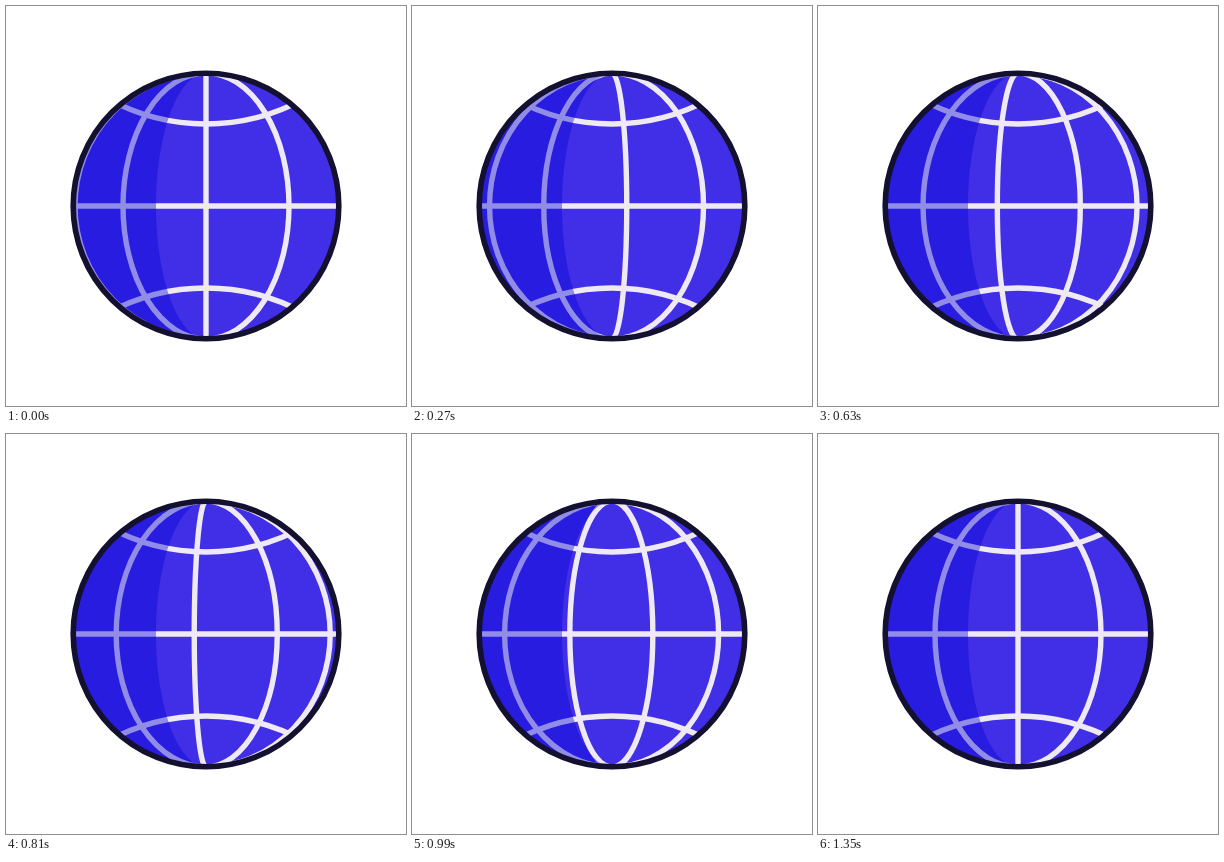
An HTML page with a canvas that plays this animation: 400 by 400 pixels, repeating every 3.97 s.

```html
<!DOCTYPE html>
<html lang="en">
<head>
<meta charset="utf-8">
<title>Spinning globe</title>
<style>
  html, body { margin: 0; width: 100%; height: 100%; overflow: hidden; background: #fff; }
  canvas { display: block; width: 100vmin; height: 100vmin; }
</style>
</head>
<body>
<canvas id="stage" width="400" height="400"></canvas>
<script>
const ctx = document.getElementById('stage').getContext('2d');
const LOOP = 3970, STEP = 30, SPIN = 1350;
const FAST_FROM = 508, FAST_TO = 833;
const C = 200, R = 132.8, POLE = 133;
const LINE = '#efe9f4';

// Cubic bezier easing solved by bisection
function bezier(x1, y1, x2, y2) {
  const at = (a, b, t) => 3 * (1 - t) * (1 - t) * t * a + 3 * (1 - t) * t * t * b + t * t * t;
  return x => {
    let lo = 0, hi = 1;
    for (let i = 0; i < 24; i++) {
      const mid = (lo + hi) / 2;
      if (at(x1, x2, mid) < x) lo = mid; else hi = mid;
    }
    return at(y1, y2, (lo + hi) / 2);
  };
}
const speedUp = bezier(0.805, 0, 0.833, 0.833);
const slowDown = bezier(0.167, 0.167, 0.435, 1);

// Number of meridian spacings travelled to the right
function travel(ms) {
  if (ms >= SPIN) return 4;
  if (ms < FAST_FROM) return speedUp(ms / FAST_FROM);
  if (ms < FAST_TO) return 1 + 2 * (ms - FAST_FROM) / (FAST_TO - FAST_FROM);
  return 3 + slowDown((ms - FAST_TO) / (SPIN - FAST_TO));
}

// Signed half width of a meridian at position p, centre = 0, rim = 2
function bulge(p) {
  const a = Math.abs(p);
  return Math.sign(p) * (a < 1 ? 83 * a : 83 + 48 * (a - 1));
}

function meridian(p) {
  const w = bulge(p);
  ctx.beginPath();
  if (Math.abs(w) < 0.01) {
    ctx.moveTo(C, C - POLE);
    ctx.lineTo(C, C + POLE);
  } else {
    ctx.ellipse(C, C, Math.abs(w), POLE, 0, -Math.PI / 2, Math.PI / 2, w < 0);
  }
  ctx.stroke();
}

function parallels() {
  ctx.beginPath();
  ctx.moveTo(C - R, C);
  ctx.lineTo(C + R, C);
  ctx.stroke();
  for (const side of [-1, 1]) {
    ctx.beginPath();
    ctx.arc(C, C + side * 286.5, 204.5, -side * Math.PI / 2 - 0.5, -side * Math.PI / 2 + 0.5);
    ctx.stroke();
  }
}

function shade() {
  ctx.beginPath();
  ctx.arc(C, C, R, Math.PI / 2, Math.PI * 1.5);
  ctx.ellipse(C, C, 50, R, 0, Math.PI * 1.5, Math.PI / 2, true);
  ctx.fillStyle = 'rgba(0, 0, 210, 0.4)';
  ctx.fill();
}

function draw(ms) {
  ctx.fillStyle = '#fff';
  ctx.fillRect(0, 0, 400, 400);

  ctx.save();
  ctx.beginPath();
  ctx.arc(C, C, R, 0, Math.PI * 2);
  ctx.clip();
  ctx.fillStyle = '#412fe7';
  ctx.fillRect(0, 0, 400, 400);

  ctx.strokeStyle = LINE;
  ctx.lineWidth = 5.4;
  parallels();
  const shift = travel(ms) % 1;
  for (let k = -2; k <= 1; k++) {
    if (k + shift > -2) meridian(k + shift);
  }
  shade();
  ctx.restore();

  ctx.beginPath();
  ctx.arc(C, C, R, 0, Math.PI * 2);
  ctx.strokeStyle = '#13112f';
  ctx.lineWidth = 5.6;
  ctx.stroke();
}

const start = performance.now();
function tick() {
  const t = (performance.now() - start) % LOOP;
  draw(Math.floor(t / STEP) * STEP);
  requestAnimationFrame(tick);
}
tick();
</script>
</body>
</html>
```
